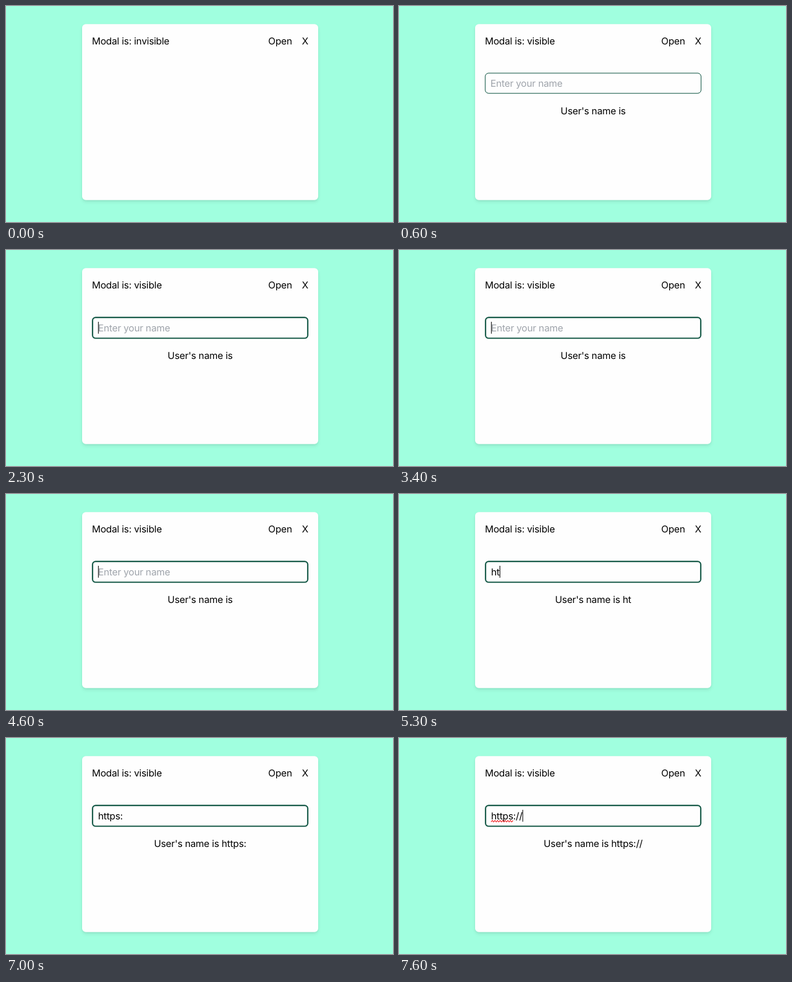
Write an HTML page that moves like this. It is 600 px wide and 337 px high and loops after 8 s.

```html
<!DOCTYPE html>
<html lang="en">
<head>
<meta charset="utf-8">
<title>Modal with name field</title>
<style>
  html, body { margin: 0; width: 100%; height: 100%; overflow: hidden; background: #a0ffdf; }
  svg { display: block; width: 100%; height: 100%; }
  text {
    font: 14.8px Inter, sans-serif;
    letter-spacing: -0.2px;
    font-feature-settings: "calt" 0;
    text-rendering: geometricPrecision;
  }
  .mid { text-anchor: middle; }
  .card {
    fill: #fefefe;
    filter: drop-shadow(0 3.8px 2.8px rgba(0, 0, 0, .08)) drop-shadow(0 1.5px 1.5px rgba(0, 0, 0, .05));
  }
  #box { fill: #fefefe; stroke: #064e3b; }
  #wave { fill: none; stroke: #f01c1c; stroke-width: 1.1; }
</style>
</head>
<body>
<svg viewBox="0 0 600 337">
  <rect class="card" x="118" y="28.3" width="366" height="274.4" rx="5.7"/>
  <text id="status" x="133.25" y="60"></text>
  <text class="mid" x="425" y="60">Open</text>
  <text class="mid" x="463.7" y="60">X</text>
  <g id="form">
    <rect id="box"/>
    <text id="field"></text>
    <path id="wave"/>
    <rect id="caret" y="112" width="1" height="18.6"/>
    <text id="echo" class="mid" x="301"></text>
  </g>
</svg>
<script>
const LOOP = 8000;
const WORD = "https://";
const OPEN = [[600, 1200], [1700, LOOP]];
const FOCUS = 2300;
const KEYS = [5100, 5300, 5500, 5700, 5900, 6400, 7400, 7500];
const CARET_OFF = [[2800, 3400], [4000, 4600], [7000, 7400]];
const SPELLCHECK = 7500;

const el = id => document.getElementById(id);
const [status, form, box, field, wave, caret, echo] =
  ["status", "form", "box", "field", "wave", "caret", "echo"].map(el);
const within = (t, spans) => spans.some(([a, b]) => t >= a && t < b);
const show = (node, on) => node.setAttribute("visibility", on ? "inherit" : "hidden");

function set(node, attrs) {
  for (const key in attrs) node.setAttribute(key, attrs[key]);
}

function setText(node, text) {
  if (node.textContent !== text) node.textContent = text;
}

function zigzag(x, y, width) {
  let d = `M${x} ${y}`;
  for (let i = 1; i * 2 <= width; i++) d += `L${x + i * 2} ${y + (i % 2 ? -2.4 : 0)}`;
  return d;
}

function layout(focused) {
  const line = focused ? 1.9 : 0.95;
  set(box, {
    x: 133.25 + line / 2, y: 104.3 + line / 2,
    width: 335.5 - line, height: 30.5 + line,
    rx: 5.7 - line / 2, "stroke-width": line
  });
  const x = 133.25 + line + 7.6;
  set(field, { x, y: focused ? 126.5 : 125.5 });
  echo.setAttribute("y", focused ? 170.4 : 168.8);
  return x;
}

function render(t) {
  const open = within(t, OPEN);
  const focused = t >= FOCUS;
  const typed = WORD.slice(0, KEYS.filter(k => t >= k).length);

  setText(status, "Modal is: " + (open ? "visible" : "invisible"));
  show(form, open);

  const x = layout(focused);
  setText(field, typed || "Enter your name");
  field.setAttribute("fill", typed ? "#000" : "#9fa4ab");
  setText(echo, typed ? "User's name is " + typed : "User's name is");

  caret.setAttribute("x", x + (typed ? field.getComputedTextLength() : 0));
  show(caret, focused && !within(t, CARET_OFF));

  const marked = t >= SPELLCHECK;
  show(wave, marked);
  if (marked) wave.setAttribute("d", zigzag(x, 131, field.getSubStringLength(0, 5)));
}

function tick() {
  render(performance.now() % LOOP);
  requestAnimationFrame(tick);
}
tick();
</script>
</body>
</html>
```
